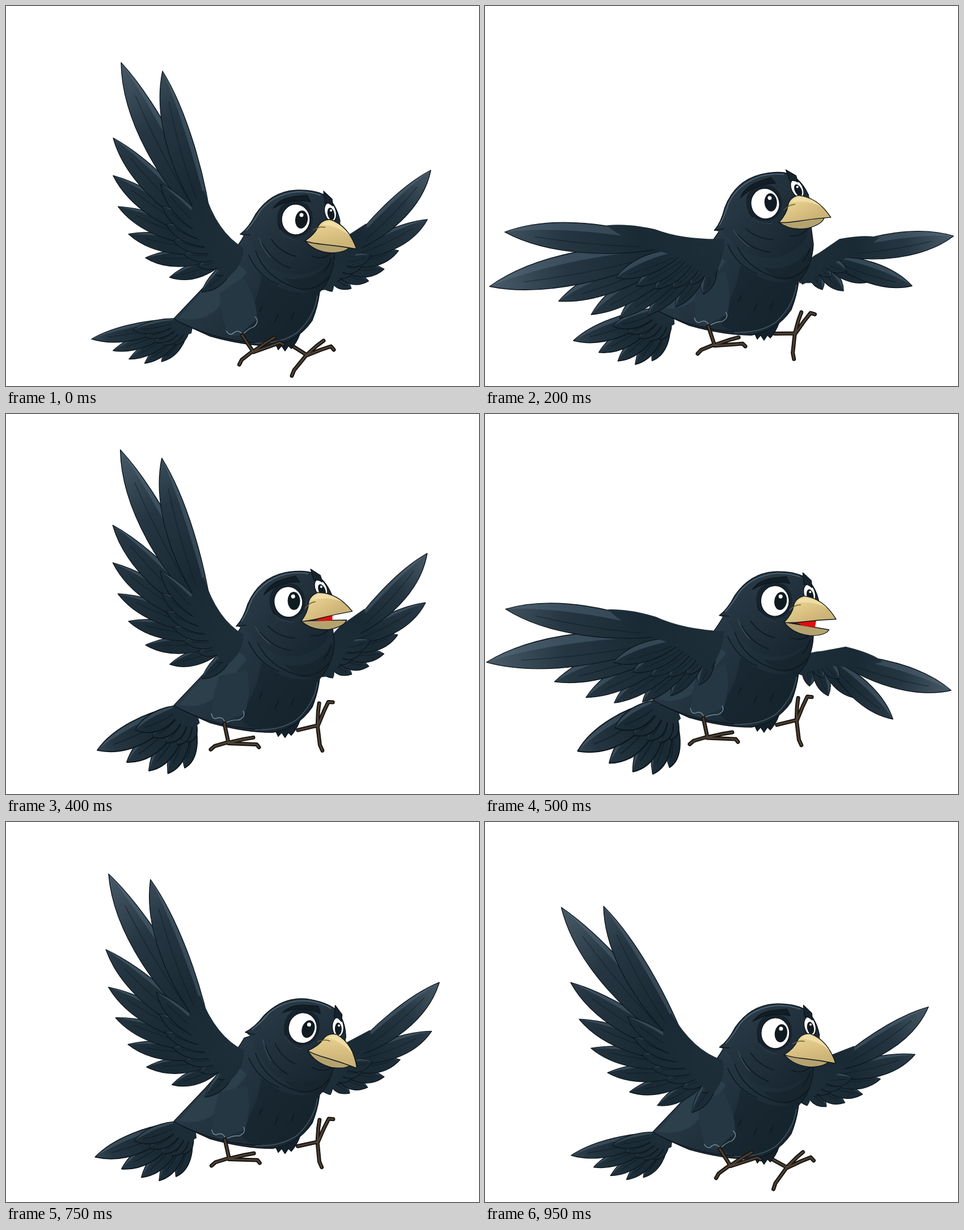
Animation, 834 px wide and 671 px high, one loop 1 s. Source, as an HTML page:

```html
<!DOCTYPE html>
<html lang="en">
<head>
<meta charset="utf-8">
<title>Flying crow</title>
<style>
  html, body { margin: 0; width: 100%; height: 100%; overflow: hidden; background: #fff; }
  svg { display: block; width: 100%; height: 100%; }
  .ink { fill: none; stroke: #0d161d; stroke-width: 1.5; stroke-linecap: round; stroke-linejoin: round; }
  .lit { fill: none; stroke: #506674; stroke-width: 1.6; stroke-linecap: round; }
  .fluff { fill: none; stroke: #8798a2; stroke-width: 1.2; }
  .edge { stroke: #0d161d; stroke-width: 1.4; stroke-linejoin: round; }
  .limb { fill: none; stroke-linecap: round; stroke-linejoin: round; }
</style>
</head>
<body>
<svg viewBox="0 0 834 671">
  <defs>
    <linearGradient id="bodyFill" gradientUnits="userSpaceOnUse" x1="350" y1="440" x2="540" y2="600">
      <stop offset="0" stop-color="#2a3c48"/><stop offset=".5" stop-color="#1f2f3a"/><stop offset="1" stop-color="#16242d"/>
    </linearGradient>
    <linearGradient id="headFill" gradientUnits="userSpaceOnUse" x1="440" y1="340" x2="550" y2="480">
      <stop offset="0" stop-color="#2a3b47"/><stop offset=".55" stop-color="#202f3a"/><stop offset="1" stop-color="#17252f"/>
    </linearGradient>
    <linearGradient id="beakFill" gradientUnits="userSpaceOnUse" x1="565" y1="376" x2="575" y2="424">
      <stop offset="0" stop-color="#ecd594"/><stop offset="1" stop-color="#cdb477"/>
    </linearGradient>
  </defs>
  <g id="bird">
    <g id="farUp"></g>
    <g id="farDown"></g>
    <g id="farLeg"></g>
    <path class="edge" fill="#14212b" d="M474 594L480 607L486 600L492 609L498 600L503 605Q516 590 520 572L500 570Z"/>
    <g id="tail"></g>
    <path class="edge" fill="url(#bodyFill)" d="M420 405Q400 440 350 495L296 552Q312 562 360 583Q420 600 470 600Q515 592 540 555Q550 530 553 505Q577 480 579 440L574 400L500 380Z"/>
    <path fill="#314550" opacity=".65" d="M345 505L305 551Q345 560 372 535L425 470Q410 455 398 450Z"/>
    <path fill="#14222c" opacity=".6" d="M450 476Q505 520 553 500Q548 540 520 570Q490 596 440 592Q405 586 420 555Q446 520 450 476Z"/>
    <path fill="#14212b" opacity=".55" d="M490 480Q545 492 578 440Q577 478 553 503Q520 510 490 480Z"/>
    <path class="ink" d="M440 432Q458 484 520 500Q550 502 570 477M428 440Q445 478 480 492M480 545l-6 12M452 530l-5 10M508 540l-5 13M560 470q10 -10 13 -25M310 560Q380 594 450 594"/>
    <path class="lit" opacity=".7" d="M549 512Q544 548 514 576Q486 597 440 595"/>
    <g id="nearLeg">
      <path fill="#253743" d="M376 500Q360 550 364 574Q376 584 385 582Q400 572 420 568Q434 530 425 490Z"/>
      <path class="fluff" d="M362 566Q364 579 374 574Q384 572 386 584M389 582Q401 577 410 578Q424 572 418 562"/>
    </g>
    <g id="nearUp"></g>
    <g id="nearDown"></g>
    <g id="head">
      <path fill="url(#headFill)" d="M413 403Q428 392 440 368Q468 326 515 325Q545 325 562 334Q588 352 590 390L577 432Q570 466 520 474Q460 476 430 415Q420 405 413 403Z"/>
      <path class="ink" d="M430 404L413 403Q428 392 440 368Q468 326 515 325Q545 325 562 334Q582 348 589 380"/>
      <path class="lit" d="M424 396Q438 380 448 362Q472 332 515 328Q538 328 554 334"/>
      <path fill="#16232d" d="M478 378Q478 344 512 344Q540 346 541 376Q538 408 508 408Q482 404 478 378Z"/>
      <path class="ink" d="M480 384Q486 412 514 412M452 420Q470 452 500 462M468 412Q482 434 510 442M540 442q20 8 36 -8"/>
      <path class="lit" opacity=".45" d="M484 396Q492 411 514 413M446 410Q452 428 466 444"/>
      <ellipse class="edge" cx="572" cy="364" rx="10" ry="17" fill="#fff" transform="rotate(-14 572 364)"/>
      <ellipse cx="573" cy="367" rx="6" ry="11" fill="#101a21" transform="rotate(-12 573 367)"/>
      <circle cx="573" cy="361" r="2" fill="#fff"/>
      <ellipse class="edge" cx="511" cy="377" rx="25" ry="27" fill="#fff"/>
      <ellipse cx="521" cy="377" rx="11" ry="16" fill="#101a21" transform="rotate(8 521 377)"/>
      <circle cx="521" cy="369" r="3.5" fill="#fff"/>
      <path class="edge" fill="#121d25" d="M471 357Q484 338 512 336L531 334L537 346Q510 341 490 348Q477 353 471 357Z"/>
      <path class="edge" fill="#16232c" d="M560 327L575 341L576 353Q568 346 562 348Z"/>
      <g id="jaw">
        <path class="edge" fill="#b5a36f" d="M527 414Q560 418 607 424Q601 435 574 436Q543 434 527 414Z"/>
        <path fill="#e00f0c" d="M545 413L584 406L582 421L560 419Z"/>
      </g>
      <g id="beak">
        <path class="edge" fill="url(#beakFill)" d="M527 415Q545 403 550 390Q556 377 572 377Q604 388 618 429Q590 424 560 421Q540 419 527 415Z"/>
        <path fill="#f4e3af" opacity=".75" d="M557 386Q563 379 573 380Q596 388 607 407Q586 388 557 386Z"/>
        <path fill="none" stroke="#6b5a35" stroke-width="1.5" d="M541 396q12 -8 22 -5"/>
      </g>
    </g>
  </g>
</svg>
<script>
const NS = 'http://www.w3.org/2000/svg';
const el = id => document.getElementById(id);
const lerp = (a, b, f) => a + (b - a) * f;
const mix = (p, q, f) => p.map((v, i) => lerp(v, q[i], f));

function add(parent, tag, attrs) {
  const node = document.createElementNS(NS, tag);
  for (const k in attrs) node.setAttribute(k, attrs[k]);
  return parent.appendChild(node);
}

// Point on a Bezier curve of any degree.
function bezier(points, f) {
  while (points.length > 1) points = points.slice(1).map((p, i) => mix(points[i], p, f));
  return points[0];
}

// Blade from base to tip; the widths bulge to either side of its axis.
function feather(g, fill, side, [bx, by], [tx, ty], [lead, trail]) {
  const vx = tx - bx, vy = ty - by, len = Math.hypot(vx, vy);
  const width = 14 + len * .085;
  const at = (f, w) => {
    const s = w * width * side / len;
    return (bx + vx * f - vy * s).toFixed(1) + ' ' + (by + vy * f + vx * s).toFixed(1);
  };
  const out = w => `M${bx} ${by}C${at(.35, w)} ${at(.75, w)} ${tx} ${ty}`;
  const back = w => `C${at(.75, w)} ${at(.35, w)} ${bx} ${by}Z`;
  add(g, 'path', { class: 'edge', fill, d: out(lead) + back(-trail) });
  add(g, 'path', { fill: '#61798a', opacity: .36, d: out(lead * .95) + back(lead * .45) });
  add(g, 'path', { class: 'ink', opacity: .5, d: `M${at(.2, -trail * .2)}Q${at(.5, -trail * .35)} ${at(.82, -trail * .12)}` });
}

// Long leading feathers, then n tips along an arc, then a short layer over their roots.
function fan({ id, joint: [cx, cy], r, side = 1, lift = 0, leads = [], arc, n, root, width, cover }) {
  const g = add(el(id), 'g', { transform: `translate(0 ${lift})` });
  const fill = `url(#${id}Fill)`;
  const grad = add(g, 'radialGradient', { id: id + 'Fill', gradientUnits: 'userSpaceOnUse', cx, cy, r });
  ['#1e2e39', '#1a2a34', '#253642', '#4a5c69']
    .forEach((color, i) => add(grad, 'stop', { offset: i / 3, 'stop-color': color }));

  const tips = [...leads];
  for (let i = 0; i < n; i++) tips.push(bezier(arc, (i / (n - 1)) ** .85));
  const base = i => mix(root[0], root[1], i / (tips.length - 1));
  for (const reach of [1, .55])
    for (let i = tips.length - 1; i >= (reach < 1 ? leads.length : 0); i--)
      feather(g, fill, side, base(i), mix(base(i), tips[i], reach), width);
  add(g, 'path', { fill, d: cover });
}

fan({ id: 'nearUp', joint: [410, 425], r: 390, leads: [[276, 115], [203, 100]],
  arc: [[189, 233], [183, 330], [195, 455], [345, 505]], n: 7,
  root: [[365, 405], [405, 440]], width: [.5, 1.05],
  cover: 'M419 427Q372 400 349 325L332 345Q312 385 350 425Q368 462 388 482Q419 460 419 427Z' });
fan({ id: 'nearDown', joint: [415, 407], r: 416, lift: 18, leads: [[35, 400], [8, 496]],
  arc: [[130, 522], [200, 565], [290, 562], [385, 510]], n: 6,
  root: [[335, 424], [405, 448]], width: [.9, .85],
  cover: 'M422 412Q350 414 300 395Q250 384 215 388Q250 420 330 440Q370 460 400 485Q424 445 422 412Z' });
fan({ id: 'farUp', joint: [565, 470], r: 265, side: -1, leads: [[749, 290], [743, 377]],
  arc: [[692, 432], [670, 470], [630, 502], [575, 504]], n: 5,
  root: [[594, 440], [564, 468]], width: [.5, 1.15],
  cover: 'M556 502Q550 450 592 412L635 384Q645 415 610 445Q590 475 575 500Z' });
fan({ id: 'farDown', joint: [565, 452], r: 266, side: -1, lift: 18, leads: [[826, 407], [753, 495]],
  arc: [[677, 488], [640, 512], [600, 506], [560, 492]], n: 4,
  root: [[605, 438], [567, 455]], width: [.8, .95],
  cover: 'M554 490Q552 455 590 436L625 412Q675 403 695 410Q665 438 620 452Q590 470 575 490Z' });
fan({ id: 'tail', joint: [310, 555], r: 200,
  arc: [[151, 588], [195, 608], [225, 642], [274, 628]], n: 5,
  root: [[312, 553], [322, 562]], width: [.5, .85],
  cover: 'M296 552L332 553L327 578Q305 588 290 566Z' });

function limb(id, d) {
  for (const [stroke, w] of [['#15120f', 7], ['#4a3e31', 3.2]])
    add(el(id), 'path', { class: 'limb', d, stroke, 'stroke-width': w });
}
limb('nearLeg', 'M385 584L392 617L368 624L361 630M392 618L418 612L436 609M392 619L442 621L446 626');
limb('farLeg', 'M500 597L530 616L508 643L504 653M530 616L548 600L560 591M530 617L555 607L573 601L578 607');

// Wings are given by their elevation in degrees, the rest by angle or share.
const STEP = 50, LOOP = 1000, RISE = 47;
const tracks = {
  near: [[0, 66], [50, 76], [200, 1], [350, 86], [500, 5], [650, 86], [750, 62], [920, 47], [1000, 66]],
  far: [[0, 44], [50, 54], [200, 10], [350, 66], [500, -14], [650, 60], [750, 39], [920, 27], [1000, 44]],
  head: [[0, 0], [280, -16], [680, 12], [1000, 0]],
  mouth: [[0, 0], [100, 0], [550, 13], [750, 0], [1000, 0]],
  tuck: [[0, 1], [310, 0], [720, 0], [1000, 1]]
};

function value(name, t) {
  const keys = tracks[name];
  const i = keys.findIndex(k => k[0] > t);
  const [t0, a] = keys[i - 1], [t1, b] = keys[i];
  return lerp(a, b, (1 - Math.cos(Math.PI * (t - t0) / (t1 - t0))) / 2);
}

const turn = (id, deg, x, y) => el(id).setAttribute('transform', `rotate(${deg} ${x} ${y})`);
const show = (id, on) => el(id).setAttribute('visibility', on ? 'visible' : 'hidden');

function draw(now) {
  const t = Math.floor((now % LOOP) / STEP) * STEP;
  const rise = RISE * (1 - Math.abs(t / 500 - 1));
  const near = value('near', t), far = value('far', t);
  const mouth = value('mouth', t), tuck = value('tuck', t);
  const raised = near > 35;

  el('bird').setAttribute('transform', `translate(0 ${-rise})`);
  // The tail tips stay low while its root climbs with the body.
  el('tail').setAttribute('transform', `translate(310 555) matrix(${1 + rise * .0016} ${-rise * .0052} ${rise * .0157} ${1 + rise * .01} 0 0) translate(-310 -555)`);
  turn('head', value('head', t), 462, 447);
  turn('beak', -mouth, 527, 415);
  turn('jaw', mouth * .2, 527, 415);
  turn('nearLeg', -22 * tuck, 394, 502);
  turn('farLeg', -46 * (1 - tuck), 506, 579);
  turn('nearUp', near - 66, 410, 425);
  turn('nearDown', near - 1, 415, 425);
  turn('farUp', 44 - far, 565, 470);
  turn('farDown', 10 - far, 565, 470);
  show('nearUp', raised);
  show('farUp', raised);
  show('nearDown', !raised);
  show('farDown', !raised);
}

const start = performance.now();
function tick() {
  draw(performance.now() - start);
  requestAnimationFrame(tick);
}
tick();
</script>
</body>
</html>
```
